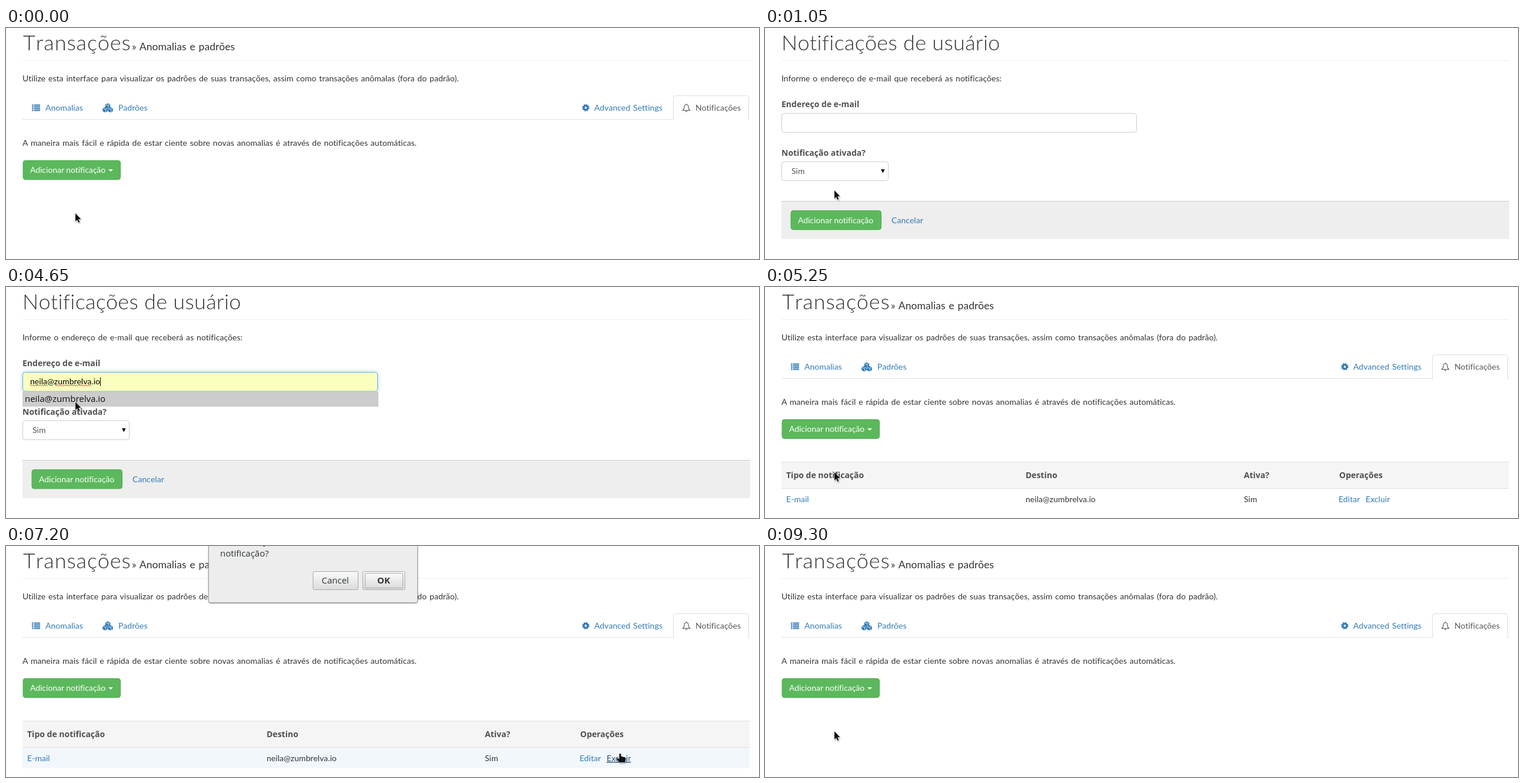
These frames come from a looping animation (1280x394 px, 9450 ms). An HTML page:

```html
<!DOCTYPE html>
<html lang="pt-BR">
<head>
<meta charset="utf-8">
<title>Notificações</title>
<style>
html, body { margin: 0; width: 100%; height: 100%; overflow: hidden; background: #fff; }
svg { display: block; }
text { font: 14px Lato, sans-serif; letter-spacing: .05px; word-spacing: 1.2px; fill: #333; white-space: pre; }
.h1 { font-size: 36px; font-weight: 300; font-kerning: none; letter-spacing: .3px; word-spacing: 0; }
.wide { letter-spacing: .9px; }
.sub { font-size: 17.5px; letter-spacing: .08px; }
.b { font: bold 14px "Noto Sans", sans-serif; letter-spacing: 0; word-spacing: 0; fill: #505050; }
.link { fill: #337ab7; }
.mute { fill: #555; }
.white { fill: #fff; letter-spacing: -.05px; word-spacing: 0; }
.os { font: 15px "Open Sans", sans-serif; letter-spacing: 0; fill: #111; }
.ok { font-weight: bold; fill: #2e3436; }
.btn { fill: #5cb85c; stroke: #4cae4c; }
.btn.on { fill: #449d44; stroke: #398439; }
.box { fill: #fff; stroke: #ccc; }
.box.focus { stroke: #66afe9; filter: drop-shadow(0 0 3px rgba(102,175,233,.6)); }
.box.fill { fill: #faffbd; }
.hint { fill: #fff; stroke: #b8b8b8; }
.hint.on { fill: #ccc; stroke: #ccc; }
.remove.on { fill: #23527c; text-decoration: underline; }
.rule { stroke: #ddd; }
.gbtn { fill: url(#face); stroke: #a6a6a6; }
.wave { fill: none; stroke: #e33; stroke-width: .9; }
.menu { fill: #fff; stroke: #ccc; filter: drop-shadow(0 4px 4px rgba(0,0,0,.15)); }
#cursor { filter: drop-shadow(1px 2px 1px rgba(0,0,0,.3)); }
#cursor path { fill: #111; stroke: #fff; stroke-width: .9; paint-order: stroke; }
</style>
</head>
<body>
<svg width="1280" height="394" viewBox="0 0 1280 394">
  <defs>
    <linearGradient id="face" x2="0" y2="1">
      <stop stop-color="#fafafa"/><stop offset="1" stop-color="#dcdcdc"/>
    </linearGradient>
    <g id="cube">
      <path d="M0-4.4 4.2-2.6V2.4L0 4.4-4.2 2.4V-2.6Z" fill="#337ab7"/>
      <path d="M-3-2.1 0-.8 3-2.1M1 .6V3" fill="none" stroke="#fff"/>
    </g>
  </defs>

  <path d="M28 55.5H1265" stroke="#eee"/>

  <g id="list">
    <text class="h1 wide" x="29" y="38">Transações</text>
    <text class="sub" x="214" y="38">» Anomalias e padrões</text>
    <text x="28" y="91">Utilize esta interface para visualizar os padrões de suas transações, assim como transações anômalas (fora do padrão).</text>

    <path class="rule" d="M28 156H1265"/>
    <path d="M1134.5 157V119.5q0-4 4-4h120q4 0 4 4V157" fill="#fff" stroke="#ddd"/>
    <path d="M44 131.5h2.5m1 0h10.5M44 134.5h2.5m1 0h10.5M44 137.5h2.5m1 0h10.5M44 140.5h2.5m1 0h10.5" stroke="#337ab7" stroke-width="2"/>
    <text class="link" x="67" y="141">Anomalias</text>
    <use href="#cube" x="173" y="133"/>
    <use href="#cube" x="168.5" y="139.5"/>
    <use href="#cube" x="177.5" y="139.5"/>
    <text class="link" x="191" y="141">Padrões</text>
    <g fill="none" stroke="#337ab7">
      <circle cx="985.5" cy="136" r="3.5" stroke-width="3.2"/>
      <circle cx="985.5" cy="136" r="5.3" stroke-width="1.8" stroke-dasharray="2.2 1.963"/>
    </g>
    <text class="link" x="1000" y="141">Advanced Settings</text>
    <path d="M1150.5 140.5q2.5-2 2.5-6 0-3.7 3.5-3.7t3.5 3.7q0 4 2.5 6ZM1156.5 129v1.5M1155 141.5q1.5 2.5 3 0" fill="none" stroke="#555" stroke-width="1.1"/>
    <text class="mute" x="1172" y="141">Notificações</text>

    <text x="28" y="201">A maneira mais fácil e rápida de estar ciente sobre novas anomalias é através de notificações automáticas.</text>
    <rect id="add" class="btn" x="29" y="226" width="165.5" height="32.5" rx="4"/>
    <text class="white" x="41" y="247">Adicionar notificação</text>
    <path d="M174 241h8l-4 4Z" fill="#fff"/>

    <g id="menu">
      <rect class="menu" x="28.5" y="261.5" width="159" height="37" rx="4"/>
      <rect id="item" x="29" y="267" width="158" height="26" fill="#f5f5f5"/>
      <text x="49" y="285">E-mail</text>
    </g>

    <g id="table">
      <rect x="28" y="298" width="1236" height="45" fill="#f5f5f5"/>
      <rect id="row" x="28" y="344" width="1236" height="35" fill="#f2f7fc"/>
      <path class="rule" d="M28 298.5H1264M28 343.5H1264"/>
      <text class="b" x="36" y="326">Tipo de notificação</text>
      <text class="b" x="443" y="326">Destino</text>
      <text class="b" x="814" y="326">Ativa?</text>
      <text class="b" x="976" y="326">Operações</text>
      <text class="link" x="36" y="367">E-mail</text>
      <text id="target" x="443" y="367"></text>
      <text x="814" y="367">Sim</text>
      <text class="link" x="975" y="367">Editar</text>
      <text id="remove" class="link remove" x="1021" y="367">Excluir</text>
    </g>

    <g id="dialog">
      <rect x="344.5" y="-20" width="355" height="116.5" rx="3" fill="#ededed" stroke="#a0a0a0" style="filter:drop-shadow(0 1px 1px rgba(0,0,0,.4))"/>
      <path d="M437 .5q4 1 4-1.5" fill="none" stroke="#555"/>
      <text class="os" x="364" y="17.5" style="fill:#2e3436">notificação?</text>
      <rect class="gbtn" x="522" y="43.5" width="76.5" height="31" rx="2.5"/>
      <rect class="gbtn" x="606.5" y="43.5" width="71.5" height="31" rx="2.5"/>
      <rect class="gbtn" x="610.5" y="46.5" width="64" height="25" rx="1"/>
      <text class="os" x="536.5" y="64" style="fill:#2e3436">Cancel</text>
      <text class="os ok" x="631" y="64">OK</text>
    </g>
  </g>

  <g id="form">
    <text class="h1" x="28" y="38">Notificações de usuário</text>
    <text x="28" y="91">Informe o endereço de e-mail que receberá as notificações:</text>
    <text class="b" x="28" y="135">Endereço de e-mail</text>
    <rect id="field" class="box" x="28.5" y="145.5" width="603" height="32.5" rx="4"/>
    <text id="typed" class="mute" x="41" y="166"></text>
    <path id="wave1" class="wave"/>
    <path id="wave2" class="wave"/>
    <path id="caret" d="M0 154V169" stroke="#000"/>
    <text class="b" x="28" y="218">Notificação ativada?</text>
    <g id="hint">
      <rect id="hintBox" class="hint" x="28.5" y="179" width="604" height="24.5"/>
      <text id="hintText" class="os" x="32" y="196"></text>
    </g>
    <rect class="box" x="28.5" y="228" width="181" height="32.5" rx="4"/>
    <text class="mute" x="45" y="249">Sim</text>
    <path d="M197 241h6.5l-3.25 6.5Z"/>
    <rect x="28" y="295" width="1237" height="65" fill="#eee"/>
    <path d="M28 295.5H1265" stroke="#ccc"/>
    <rect id="save" class="btn" x="44" y="311.5" width="153.5" height="32.5" rx="4"/>
    <text class="white" x="56" y="333">Adicionar notificação</text>
    <text class="link" x="215" y="333">Cancelar</text>
  </g>

  <g id="cursor">
    <path id="arrow" d="M0 0V13.7L3 10.9 5.2 15.8 7.3 14.9 5.2 10H9.4Z"/>
    <path id="beam" d="M-3.5-6.5H-1L0-6 1-6.5H3.5V-5.5H1L.6-5V5L1 5.5H3.5V6.5H1L0 6-1 6.5H-3.5V5.5H-1L-.6 5V-5L-1-5.5H-3.5Z"/>
    <path id="hand" d="M-1.5 1Q0-1.2 1.5 1V5L8 6.2Q10 7 9.5 10L8 15H-1.5L-5.5 10Q-6.5 8-4.5 7.8L-1.5 9.5Z"/>
  </g>
</svg>

<script>
const LOOP = 9450, STEP = 150, MAIL = 'neila@zumbrelva.io';
const $ = id => document.getElementById(id);
const show = (id, on) => { $(id).style.display = on ? '' : 'none'; };
const mark = (id, name, on) => $(id).classList.toggle(name, !!on);

// Each step overrides part of the state from its time on.
const steps = [
  [0, { view: 'list', cur: 'arrow', x: 118, y: 316, len: 0 }],
  [150, { y: 301 }],
  [300, { y: 274 }],
  [450, { y: 243, cur: 'hand', add: 1 }],
  [600, { menu: 1 }],
  [750, { y: 277, item: 1 }],
  [1050, { view: 'form', cur: 'arrow', add: 0, menu: 0, item: 0 }],
  [1350, { y: 246 }],
  [1500, { x: 119, y: 200 }],
  [1650, { x: 120, y: 159, cur: 'beam' }],
  [1800, { focus: 1, caret: 1 }],
  [1950, { len: 1, hint: 1, caret: 0 }],
  [2100, { len: 2 }],
  [2250, { len: 3 }],
  [2400, { len: 4 }],
  [2550, { len: 5 }],
  [2700, { cur: '', caret: 1 }],
  [2850, { caret: 0 }],
  [3000, { len: 6 }],
  [3150, { caret: 1 }],
  [3300, { caret: 0 }]
];
for (let i = 0; i < 7; i++) steps.push([3450 + i * STEP, { len: 7 + Math.round(i * 10 / 6) }]);
steps.push(
  [4500, { len: 18, fill: 1, pick: 1, caret: 1, cur: 'arrow', x: 118, y: 186 }],
  [4650, { y: 196 }],
  [4800, { hint: 0, pick: 0 }],
  [4950, { y: 262 }],
  [5100, { y: 316, cur: 'hand', save: 1 }],
  [5250, { view: 'list', cur: 'arrow', table: 1, save: 0 }]
);
glide(5550, [118, 316], [1044, 354]);
steps.push(
  [6450, { cur: 'hand', remove: 1 }],
  [7200, { dialog: 1 }],
  [7350, { dialog: 0, table: 0, remove: 0, cur: 'arrow' }]
);
glide(8400, [1044, 354], [118, 316]);

function glide(start, from, to) {
  for (let i = 1; i <= 7; i++) {
    const k = (1 - Math.cos(Math.PI * i / 7)) / 2;
    const at = n => Math.round(from[n] + (to[n] - from[n]) * k);
    steps.push([start + (i - 1) * STEP, { x: at(0), y: at(1) }]);
  }
}

function wave(id, from, to) {
  let d = `M${from} 168`;
  for (let x = from, up = 1; x < to; x += 2, up = -up) d += `q1 ${-2 * up} 2 0`;
  $(id).setAttribute('d', d);
}

function draw(t) {
  const s = {};
  for (const [at, change] of steps) if (at <= t) Object.assign(s, change);

  for (const id of ['list', 'form']) show(id, s.view === id);
  for (const id of ['menu', 'item', 'table', 'dialog', 'hint', 'caret']) show(id, s[id]);
  for (const id of ['arrow', 'beam', 'hand']) show(id, s.cur === id);
  for (const id of ['add', 'save', 'remove']) mark(id, 'on', s[id]);
  show('row', s.y > 343);
  mark('hintBox', 'on', s.pick);
  mark('field', 'focus', s.focus);
  mark('field', 'fill', s.fill);
  $('typed').textContent = MAIL.slice(0, s.len);
  $('typed').style.fill = s.fill ? '#000' : '';
  show('wave1', s.len > 5);
  show('wave2', s.len > 15);
  if (s.view === 'form' && s.caret) {
    const x = s.len ? Math.round($('typed').getComputedTextLength()) : 0;
    $('caret').setAttribute('transform', `translate(${41.5 + x})`);
  }
  $('cursor').setAttribute('transform', `translate(${s.x} ${s.y})`);
}

$('target').textContent = $('hintText').textContent = MAIL;
wave('wave1', 41, 70);
wave('wave2', 83, 145);

let last = -1;
function tick() {
  const t = Math.floor(performance.now() % LOOP / STEP) * STEP;
  if (t !== last) draw(last = t);
  requestAnimationFrame(tick);
}
tick();
</script>
</body>
</html>
```
